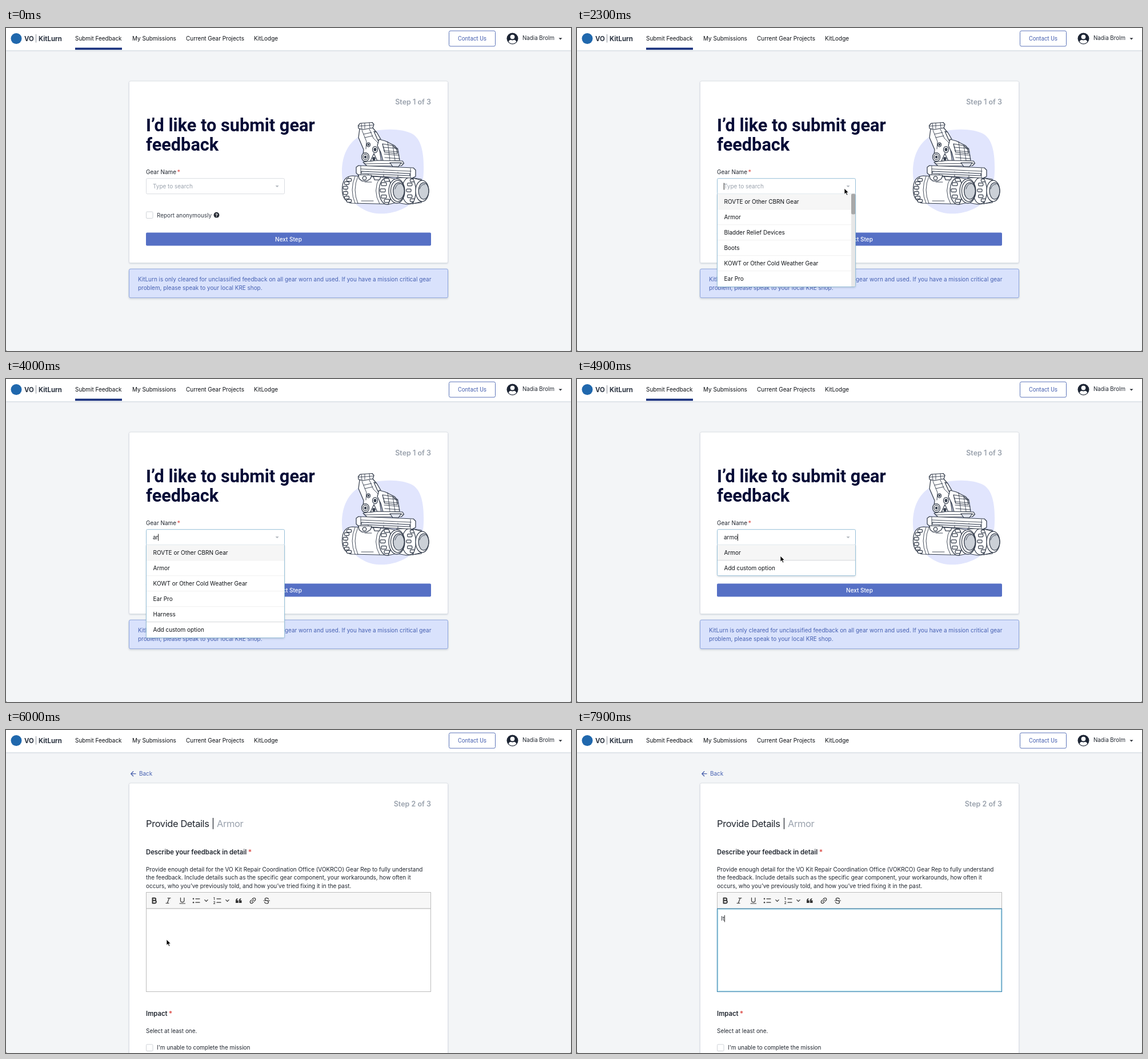
An HTML page for the animation above (8 s loop, 989 px wide and 566 px high).

```html
<!DOCTYPE html>
<html lang="en">
<head>
<meta charset="utf-8">
<title>Gear feedback form</title>
<style>
  html, body { margin: 0; width: 100%; height: 100%; overflow: hidden; background: #f3f5f7; }
  svg { display: block; width: 100vw; height: 100vh; }
  text { font-family: Inter, "Liberation Sans", sans-serif; font-optical-sizing: none; white-space: pre; }
  .roboto { font-family: Roboto, Arial, sans-serif; }
  .line { fill: none; stroke-linecap: round; stroke-linejoin: round; }
  .art { fill: #fff; stroke: #343d4c; stroke-width: 1.25; stroke-linejoin: round; stroke-linecap: round; }
  .thin { fill: none; stroke-width: .9; }
</style>
</head>
<body>
<svg id="stage" viewBox="0 0 989 566" xmlns="http://www.w3.org/2000/svg">
  <defs>
    <filter id="soft" x="-5%" y="-10%" width="110%" height="125%">
      <feDropShadow dx="0" dy="1" stdDeviation="1.2" flood-color="#1b2a4a" flood-opacity=".16"/>
    </filter>
    <filter id="lift" x="-10%" y="-10%" width="120%" height="125%">
      <feDropShadow dx="0" dy="1.5" stdDeviation="1.5" flood-color="#22364a" flood-opacity=".2"/>
    </filter>
  </defs>
  <rect width="989" height="566" fill="#f3f5f7"/>

  <g id="header">
    <rect y="-3" width="989" height="42" fill="#fff" filter="url(#soft)"/>
    <circle cx="18" cy="18.5" r="9.5" fill="#2068ad"/>
    <path d="M52.5 11V25.5" stroke="#8a909a" stroke-width="1"/>
    <rect id="underline" x="121" y="34.5" width="82" height="3.7" fill="#19317e"/>
    <rect x="775.5" y="5" width="81" height="27" rx="2.5" fill="#fff" stroke="#5c75b9"/>
    <circle cx="886.5" cy="18.5" r="10" fill="#1d2534"/>
    <circle cx="886.5" cy="15.6" r="3.9" fill="#fff"/>
    <path d="M879.700 24.200C880.300 21.800 882 20.800 883.700 20.800Q886.500 22 889.300 20.800C891 20.800 892.700 21.800 893.300 24.200A9 9 0 0 1 879.700 24.200Z" fill="#fff"/>
    <path d="M967.5 17.5H973.5L970.5 20.5Z" fill="#20252d"/>
  </g>

  <g id="step1">
    <rect x="215.5" y="93" width="558" height="318.5" rx="2.5" fill="#fff" stroke="#dde1e6" filter="url(#soft)"/>
    <g id="art" class="art"></g>
    <rect x="215.5" y="422.2" width="558" height="50.5" rx="2.5" fill="#d9e2fc" stroke="#8ea4dc" filter="url(#lift)"/>
    <rect id="button" x="245" y="358.5" width="499" height="23" rx="2"/>
    <rect x="245.5" y="322" width="11.5" height="11.5" rx="1.5" fill="#fff" stroke="#cfd3d8"/>
    <circle cx="368.5" cy="327.7" r="4.9" fill="#272c35"/>
    <rect id="field" x="245.5" y="263.7" width="242" height="27" rx="2" fill="#fff"/>
    <path id="arrow" d="M471.6 276H477.6L474.6 279.2Z"/>
  </g>

  <g id="step2">
    <rect x="215.5" y="93" width="558" height="500" rx="2.5" fill="#fff" stroke="#dde1e6" filter="url(#soft)"/>
    <path class="line" d="M227 76.7H219M222.7 72.7L218.7 76.7L222.7 80.7" stroke="#4b62ad" stroke-width="1.3"/>
    <rect x="245.5" y="284.5" width="498" height="28.5" fill="#f7f7f7" stroke="#bdbdbd"/>
    <g id="tools" class="line" stroke="#333" stroke-width="1.2"></g>
    <rect x="245.5" y="313" width="498" height="145.5" fill="#fff" stroke="#bdbdbd"/>
    <g id="focus" fill="none">
      <rect x="247" y="314.5" width="495" height="142.5" stroke="#d9f1f5" stroke-width="2"/>
      <rect x="245.5" y="313.2" width="498" height="145.3" stroke="#3d89b4" stroke-width="1.2"/>
    </g>
    <rect x="245.5" y="551" width="11.5" height="11.5" rx="1.5" fill="#fff" stroke="#cfd3d8"/>
  </g>

  <g id="menu"></g>
  <path id="caret" stroke="#222" stroke-width="1" fill="none"/>
  <path id="mouse" d="M0 0V10.3L2.4 8.1L4.1 12L5.9 11.2L4.2 7.4H7.4Z" fill="#000" stroke="#fff" stroke-width=".8" stroke-linejoin="round"/>
  <path d="M0 563.5Q0 566 2.5 566H0ZM989 563.5Q989 566 986.5 566H989Z" fill="#555"/>
</svg>
<script>
const LOOP = 8000;
const NS = 'http://www.w3.org/2000/svg';
const $ = id => document.getElementById(id);

function add(parent, tag, attrs = {}, content) {
  const el = document.createElementNS(NS, tag);
  for (const key in attrs) el.setAttribute(key, attrs[key]);
  if (content !== undefined) el.textContent = content;
  parent.appendChild(el);
  return el;
}
const text = (parent, x, y, str, fill = '#15191f', size = 9.95, more = {}) =>
  add(parent, 'text', { x, y, fill, 'font-size': size, ...more }, str);
const set = (el, attrs) => { for (const key in attrs) el.setAttribute(key, attrs[key]); };
const show = (el, on) => el.setAttribute('visibility', on ? 'visible' : 'hidden');

const RED = '#dc4a45', GREY = '#9aa2ad', BLUE = '#4660b2', INK = '#20262f';
const bold = { 'font-weight': 700 }, semi = { 'font-weight': 600 }, medium = { 'font-weight': 500 };
const header = $('header'), step1 = $('step1'), step2 = $('step2');

// Header
text(header, 32, 22.5, 'VO', '#2b3340', 11.4, bold);
text(header, 57, 22.5, 'KitLurn', '#2b3340', 11.4, bold);
[[121, 'Submit Feedback'], [221, 'My Submissions'], [315, 'Current Gear Projects'], [434, 'KitLodge']]
  .forEach(([x, label]) => text(header, x, 22.2, label, '#0c0f14'));
text(header, 816, 22.2, 'Contact Us', '#4a63b2', 10.2, { class: 'roboto', 'text-anchor': 'middle' });
text(header, 904, 21.2, 'Nadia Brolm', INK, 9.75);

// First page
const title = { class: 'roboto', ...bold };
const stepLabel = { ...semi, 'text-anchor': 'end' };
text(step1, 744, 134, 'Step 1 of 3', GREY, 12.5, stepLabel);
text(step1, 245, 181.3, 'I’d like to submit gear', '#050b36', 30.7, title);
text(step1, 245, 214.8, 'feedback', '#050b36', 30.7, title);
text(step1, 245, 256, 'Gear Name', INK);
text(step1, 299.5, 256.3, '*', RED, 11);
text(step1, 264, 331.5, 'Report anonymously', '#343b46', 9.9);
text(step1, 368.5, 330.7, '?', '#fff', 8.2, { ...bold, 'text-anchor': 'middle' });
text(step1, 494.5, 373.8, 'Next Step', '#fff', 10, { ...medium, 'text-anchor': 'middle' });
text(step1, 231, 443.8, 'KitLurn is only cleared for unclassified feedback on all gear worn and used. If you have a mission critical gear', BLUE);
text(step1, 231, 458.5, 'problem, please speak to your local KRE shop.', BLUE);
const value = text(step1, 257, 281, '');

// Second page
text(step2, 744, 134, 'Step 2 of 3', GREY, 12.5, stepLabel);
text(step2, 233, 80.4, 'Back', BLUE);
const tight = { 'letter-spacing': '-.025em' };
text(step2, 245, 170.3, 'Provide Details |', INK, 16.5, tight);
text(step2, 369, 170.3, 'Armor', GREY, 16.5, tight);
text(step2, 245, 217.7, 'Describe your feedback in detail', INK, 11.3, semi);
text(step2, 423.7, 218, '*', RED, 12, semi);
['Provide enough detail for the VO Kit Repair Coordination Office (VOKRCO) Gear Rep to fully understand',
 'the feedback. Include details such as the specific gear component, your workarounds, how often it',
 'occurs, who you’ve previously told, and how you’ve tried fixing it in the past.']
  .forEach((row, i) => text(step2, 245, 247.7 + i * 14.6, row, INK));
text(step2, 245, 501, 'Impact', INK, 11.3, semi);
text(step2, 284.7, 501.3, '*', RED, 12, semi);
text(step2, 245, 531, 'Select at least one.', INK);
text(step2, 264, 560.3, "I'm unable to complete the mission", INK);
const note = text(step2, 252, 334, '', INK);

// Editor toolbar
const tools = $('tools');
const stroke = (parent, d, more = {}) => add(parent, 'path', { d, ...more });
stroke(tools, 'M256.5 294.5V303.5H260.5A2.3 2.3 0 0 0 260.5 298.8H256.5M256.5 294.5H260A2.1 2.1 0 0 1 260 298.8', { 'stroke-width': 1.9 });
stroke(tools, 'M283 294.5H288M280 303.5H285M285.7 294.5L282.3 303.5');
stroke(tools, 'M305.5 294V298.5A3.2 3.2 0 0 0 311.9 298.5V294M304 304H313.5');
for (const y of [295.8, 302.2]) {
  stroke(tools, `M332 ${y}H339M369 ${y}H376`);
  add(tools, 'circle', { cx: 328, cy: y, r: 1.2, fill: '#333', stroke: 'none' });
}
text(tools, 363, 298.3, '1', '#333', 6, { ...bold, stroke: 'none' });
text(tools, 362.7, 305, '2', '#333', 6, { ...bold, stroke: 'none' });
for (const x of [350.5, 387.5]) stroke(tools, `M${x - 2.7} 297.6L${x} 300.4L${x + 2.7} 297.6`);
for (const x of [402, 407.8])
  stroke(tools, `M${x + 4} 295C${x + 1} 295 ${x} 297 ${x} 300V303H${x + 4.7}V298.6H${x + 2.3}Q${x + 2.3} 296.5 ${x + 4} 295Z`, { fill: '#333', stroke: 'none' });
const link = add(tools, 'g', { transform: 'translate(432 299) rotate(-45)' });
stroke(link, 'M-1 -2.5H-3.2A2.5 2.5 0 0 0 -3.2 2.5H-1M1 -2.5H3.2A2.5 2.5 0 0 1 3.2 2.5H1M-2.3 0H2.3');
stroke(tools, 'M459.5 296.2C458.5 293.5 453 293.7 453.2 296.7C453.4 298 455 298.5 456.5 299C461 300.3 460 304 456.5 304C454 304 453 302.9 452.7 301.7M451 299H461.5');

drawGoggles($('art'));

function drawGoggles(g) {
  const p = (d, more = {}) => add(g, 'path', { d, ...more });
  const thin = d => p(d, { class: 'thin' });
  const oval = (cx, cy, rx, ry, more = {}) => add(g, 'ellipse', { cx, cy, rx, ry, ...more });
  const lens = { fill: '#cbd0d7' };
  const dark = { fill: '#343d4c' };
  // Grip blocks along the left half of an oval rim
  const grips = (cx, rx, ry, count, w, h) => {
    for (let i = 0; i < count; i++) {
      const a = (i / (count - 1) - .5) * 2.3;
      add(g, 'rect', { x: cx - rx * Math.cos(a), y: 284.5 + ry * Math.sin(a) - h / 2, width: w, height: h, rx: 1.2 });
    }
  };

  p('M588 252C588 222 600 200 620 189C646 175 692 174 712 186C728 196 732 222 731 252C730 278 723 302 698 315C674 328 645 328 628 319C600 305 588 280 588 252Z', { fill: '#e1e5fd', stroke: 'none' });

  // Helmet mount
  p('M619 177L641 174L648 182L655 196L653 208L657 234L630 236L624 231L626 213L617 192Z');
  p('M616.500 171L620 167L641 165.500L644 169L642 175L625 178L617 176Z');
  thin('M617 172L643 170M622 167L623 177M628 167V176M636 166L637 175');
  thin('M623 179L631 199L630 212M636 177L643 193M626 186L640 183M628 192L642 189M643 193L651 201');
  p('M644 181L649 183L656 195L651 197Z');
  p('M653 195L664 198L680 206L686 213L689 232L660 233L656 218L650 206Z');
  p('M659 203L677 206L684 213L685 220L663 218Z');
  for (let i = 0; i < 4; i++) thin(`M${660 + i} ${209 + i * 6}L${686 + i} ${211 + i * 6}`);
  thin('M668 199L672 232M677 206L681 232');
  oval(634.500, 204.500, 3, 3.500);
  oval(634.500, 204.500, 1, 1.300, dark);
  oval(646, 213, 4.500, 5.500);
  oval(646, 213, 1.800, 2.300, dark);
  oval(629, 226, 6.500, 7.500);
  oval(629, 226, 4, 4.800);
  oval(629, 226, 1.500, 2, dark);
  p('M638 233L644 220L650 233Z');
  oval(644, 229, 2, 2.500, dark);
  p('M625 235L650 232L694 233L696.500 237L692 241.500L632 242Z');
  thin('M627 238L694 237');
  p('M672 236H692L687 243H677Z', { fill: '#e1e5ee' });

  // Right tube
  p('M684 263L706 261.500L727 265V306L702 309L684 306Z');
  oval(706, 285, 13, 23);
  grips(712, 11, 19, 5, 8, 5);
  p('M712 263L728 267V304L712 308Q723 285 712 263Z');
  oval(728.500, 285.500, 11.500, 18.500);
  oval(731, 285.500, 9, 14.500, lens);
  thin('M724 282Q727 273 733 274');

  // Left tube
  p('M606 259C592 260 588.500 271 588.500 283C588.500 297 595 306 606 307L669 308.500L675 285L668 262Z');
  thin('M600 260.500Q590 284 600 306M611 260Q601 284 611 307M616 260Q606 284 616 307.500');
  grips(601, 11, 20, 6, 8, 5);
  thin('M654 262Q641 285 654 308M622 303H643M628 270H640');
  oval(667, 285.500, 14, 23.500);
  grips(667, 12, 20, 5, 9, 5.500);
  p('M669 262L684 265V306L669 309Q681 285 669 262Z');
  oval(684, 285.500, 14, 21.500);
  oval(685.500, 285.500, 12, 18.500);
  oval(687.500, 285.500, 9.800, 14.500, lens);
  thin('M681 282Q684 272 690 273');

  // Bridge
  p('M613 244L617 241L713 245L717 249V260L711 263L617 258L613 254Z');
  thin('M621 242V258M621 247L709 251M708 246V262M634 251V259M661 252V261M686 253V261');
  p('M622 251L707 255V259L622 255Z', { fill: '#eef0f5' });
  p('M617 257L640 258L638 264L632 268H623L618 264Z');
  oval(627.500, 263, 3.200, 3.200);
  p('M643 260L656 261L654 266H645Z');
}

// Drop-down list
const OPTIONS = ['ROVTE or Other CBRN Gear', 'Armor', 'Bladder Relief Devices', 'Boots',
  'KOWT or Other Cold Weather Gear', 'Ear Pro', 'Flight Jackets', 'Gloves', 'Harness', 'Helmets'];
const menu = $('menu');
const ROW = 27;
let menuKey = null;

function drawMenu(query) {
  if (query === menuKey) return;
  menuKey = query;
  menu.textContent = '';
  if (query === null) return;
  let rows = OPTIONS.filter(name => name.toLowerCase().includes(query));
  if (query) rows.push('Add custom option');
  const scrolls = rows.length > 6;
  rows = rows.slice(0, 6);
  const bottom = 291 + rows.length * ROW + (rows.length < 6 ? -.3 : .5);
  const frame = `M245.5 290.5V${bottom - 2}Q245.5 ${bottom} 247.5 ${bottom}H485.5Q487.5 ${bottom} 487.5 ${bottom - 2}V290.5Z`;
  add(menu, 'path', { d: frame, fill: '#fff', filter: 'url(#lift)' });
  add(menu, 'rect', { x: 246, y: 290.5, width: 241, height: ROW, fill: '#f6f6f6' });
  rows.forEach((name, i) => {
    const y = 290.7 + i * ROW;
    if (i) add(menu, 'path', { d: `M246 ${y}H487`, stroke: name.startsWith('Add') ? '#d2d5d8' : '#f0f0f0' });
    text(menu, 257.5, y + 17.1, name, '#0f1216', 10);
  });
  if (scrolls) {
    add(menu, 'rect', { x: 480, y: 290.5, width: 7.2, height: bottom - 291, fill: '#e7e7e7' });
    add(menu, 'rect', { x: 480, y: 290.5, width: 7.2, height: 36, rx: 2.5, fill: '#a8a8a8' });
  }
  add(menu, 'path', { d: frame.replace('Z', ''), fill: 'none', stroke: '#96bfd8' });
}

// Timeline
const OPEN = 2200, PICK = 5200, NEXT = 6000, FOCUS = 7200;
const KEYS = [3800, 4000, 4250, 4500], NOTE_KEYS = [7700, 7850];
const typed = (word, keys, t) => word.slice(0, keys.filter(k => t >= k).length);
const blinkOn = (t, times) => {
  const last = Math.max(...times.filter(k => k <= t));
  return (t - last) % 1000 < 500;
};
// time, x, y
const TRACK = [[1000, 454, 282], [1250, 454, 282], [1300, 456, 282], [1480, 456, 282], [1600, 466, 281],
  [1900, 466, 281], [2150, 468, 281], [4550, 468, 281], [4850, 356, 310], [5250, 356, 310],
  [5700, 281, 367], [6300, 281, 367], [6600, 284, 354], [8000, 284, 354]];

function mouseAt(t) {
  const i = Math.max(1, TRACK.findIndex(k => k[0] > t));
  const [a, b] = [TRACK[i - 1], TRACK[i]];
  const u = Math.min(1, Math.max(0, (t - a[0]) / (b[0] - a[0])));
  const e = u * u * (3 - 2 * u);
  return [a[1] + (b[1] - a[1]) * e, a[2] + (b[2] - a[2]) * e];
}

function draw(t) {
  const first = t < NEXT;
  const open = t >= OPEN && t < PICK;
  const query = typed('armo', KEYS, t);
  const [x, y] = mouseAt(t);
  const focused = t >= FOCUS;

  step1.setAttribute('display', first ? 'inline' : 'none');
  step2.setAttribute('display', first ? 'none' : 'inline');
  show($('underline'), first);
  show($('focus'), focused);

  const picked = t >= PICK;
  value.textContent = picked ? 'Armor' : query || 'Type to search';
  value.setAttribute('fill', picked || query ? '#15191f' : GREY);
  const hover = t >= 1500 && t < OPEN;
  set($('field'), { stroke: open ? '#96bfd8' : hover ? '#a3a7ad' : '#d9dce1' });
  set($('arrow'), { fill: picked ? '#343a43' : '#b4b9c0' });
  set($('button'), { fill: picked && y > 358 ? '#182e7c' : '#5670c5' });
  drawMenu(open ? query : null);

  note.textContent = typed('It', NOTE_KEYS, t);
  const caretOn = open ? blinkOn(t, [OPEN, ...KEYS]) : focused && blinkOn(t, [FOCUS, ...NOTE_KEYS]);
  show($('caret'), caretOn);
  if (caretOn) {
    const box = open ? value : note;
    const width = open && !query ? 0 : box.getComputedTextLength();
    set($('caret'), { d: `M${(open ? 257 : 252) + width + .3} ${open ? 271.5 : 324.5}v12` });
  }

  const typing = (t >= KEYS[0] && t < 4550) || t >= NOTE_KEYS[0];
  show($('mouse'), t >= 1000 && !typing);
  set($('mouse'), { transform: `translate(${x} ${y})` });
}

const start = performance.now();
function tick() {
  draw((performance.now() - start) % LOOP);
  requestAnimationFrame(tick);
}
tick();
</script>
</body>
</html>
```
